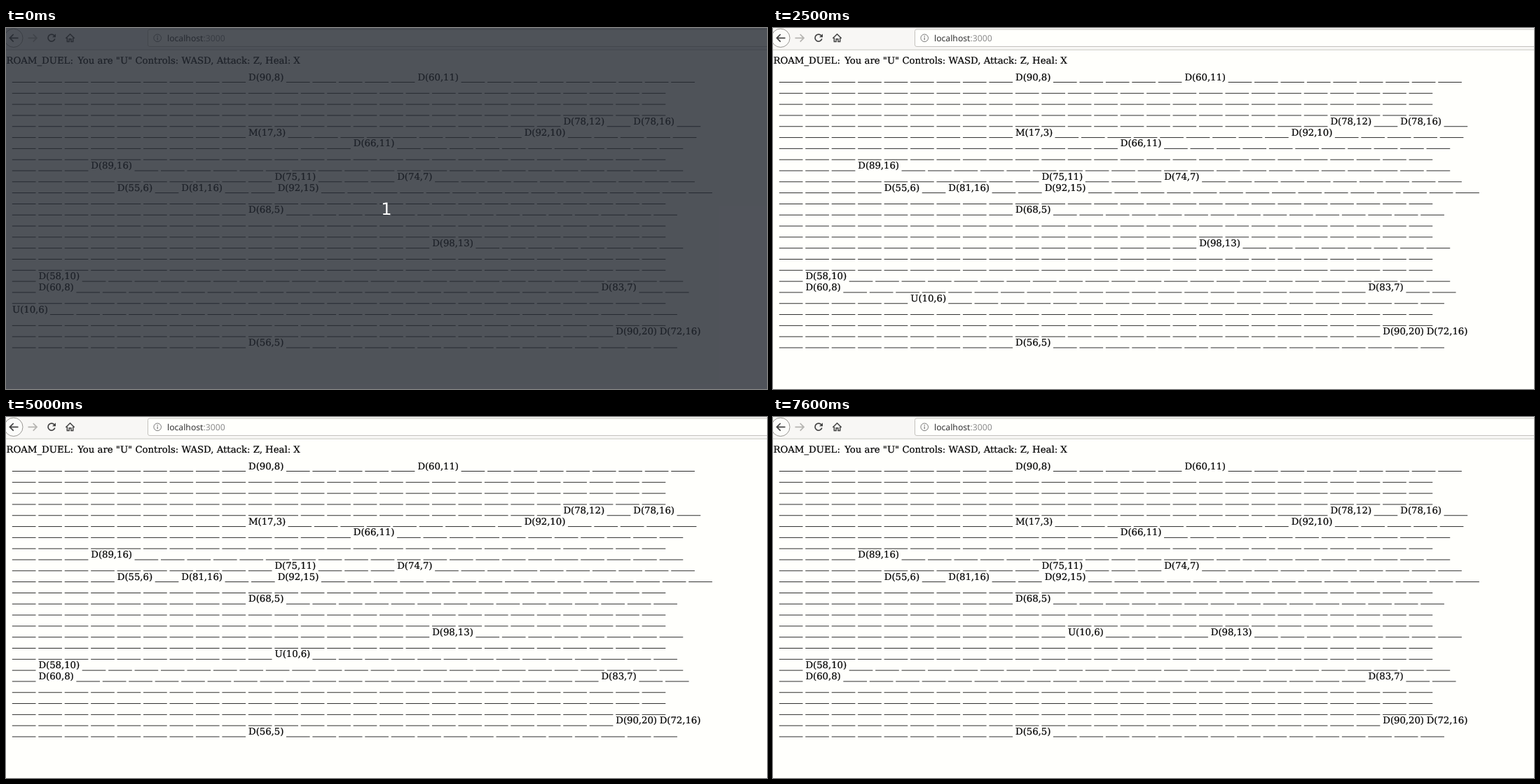
These frames come from a looping animation (1086x516 px, 8 s). An HTML page:

```html
<!DOCTYPE html>
<html lang="en">
<head>
<meta charset="utf-8">
<title>Grid game</title>
<style>
html, body { margin: 0; width: 100%; height: 100%; overflow: hidden; background: #fffffc; }
svg { display: block; width: 100vw; height: 100vh; }
text { white-space: pre; text-rendering: geometricPrecision; }
.page text { font: 13.315px "DejaVu Serif", serif; letter-spacing: -.06px; fill: #000; stroke: #000; stroke-width: .22; }
.page .title { letter-spacing: -.02px; }
.url { font: 12.2px "Noto Sans", "Open Sans", sans-serif; fill: #333; }
.icon { fill: none; stroke: #444; stroke-width: 1.7; }
</style>
</head>
<body>
<svg viewBox="0 0 1086 516">
  <rect width="1086" height="516" fill="#fffffc"/>
  <rect width="1086" height="31" fill="#f8f7f5"/>
  <path d="M0 31.2H1086" stroke="#c9c7c3"/>
  <rect x="202.5" y="2" width="900" height="24.5" rx="2.5" fill="#fffffc" stroke="#c4c2be"/>
  <circle cx="10.8" cy="14.3" r="13.2" fill="#fcfcfa" stroke="#999793"/>
  <path class="icon" d="M17.5 14.3H5.5M10.7 9L5.4 14.3L10.7 19.6"/>
  <path class="icon" style="stroke:#b5b4b1" d="M31.5 14.3H43.5M38.7 9L44 14.3L38.7 19.6"/>
  <path class="icon" d="M69.2 11.4A5 5 0 1 0 69.8 15.6"/>
  <path d="M71 8.2V13.2H66Z" fill="#444"/>
  <path class="icon" style="stroke-width:1.5" d="M85.3 14.8L91.5 8.8L97.7 14.8M87.3 14V19.5H90.1V15.8H92.9V19.5H95.7V14"/>
  <circle cx="216.2" cy="14.3" r="5.3" fill="none" stroke="#777"/>
  <path d="M216.2 13.4V17.3M216.2 11.1V12.4" stroke="#777" stroke-width="1.2"/>
  <text class="url" x="230" y="18.7">localhost<tspan fill="#8c8c8c">:3000</tspan></text>
  <g class="page">
    <text class="title" x="0.4" y="50.7">ROAM_DUEL:</text>
    <text class="title" x="102.2" y="50.7">You are "U" Controls: WASD, Attack: Z, Heal: X</text>
    <path id="blanks" stroke="#000" stroke-width=".83"/>
    <g id="labels"></g>
  </g>
  <g id="countdown">
    <rect width="1086" height="516" fill="#242831" fill-opacity=".8"/>
    <text x="543" y="267.3" text-anchor="middle" font-family="DejaVu Sans, sans-serif" font-size="24" fill="#fff">1</text>
  </g>
</svg>
<script>
const LOOP = 8000, SIZE = 25, SCALE = 0.8322;
const LEFT = 9, TOP = 74.6, LINE = 19 * SCALE;
const BLANK = 40, SPACE = 5, DROP = 3.5 * SCALE;
const ADVANCE = { D: 13, U: 13, M: 16, "(": 6, ")": 6, ",": 5 };

// Occupied cells by row, as "column:label"
const units = {
  0: "9:D(90,8) 15:D(60,11)",
  4: "21:D(78,12) 23:D(78,16)",
  5: "9:M(17,3) 19:D(92,10)",
  6: "13:D(66,11)",
  8: "3:D(89,16)",
  9: "10:D(75,11) 14:D(74,7)",
  10: "4:D(55,6) 6:D(81,16) 9:D(92,15)",
  12: "9:D(68,5)",
  15: "16:D(98,13)",
  18: "1:D(58,10)",
  19: "1:D(60,8) 22:D(83,7)",
  23: "23:D(90,20) 24:D(72,16)",
  24: "9:D(56,5)"
};

// Player moves, as "time:keys"
const moves = `700:S 1100:D 1300:D 1500:D 1600:D 1800:D 2200:W 2500:W 2600:W
  2800:D 2900:D 3100:D 3300:D 3500:D 3700:D 3900:W 4300:W 4500:AA 5000:D
  5200:D 5600:S 6000:A 6700:W 6900:W 7500:W 7600:D`
  .split(/\s+/).map(move => move.split(":"));
const STEP = { W: [0, -1], A: [-1, 0], S: [0, 1], D: [1, 0] };

const [blanks, labels, countdown] =
  ["blanks", "labels", "countdown"].map(id => document.getElementById(id));

const grid = Array.from({ length: SIZE }, (_, row) => {
  const cells = Array(SIZE).fill("");
  for (const unit of (units[row] || "").split(" ").filter(Boolean)) {
    const [col, label] = unit.split(":");
    cells[col] = label;
  }
  return cells;
});

const widthOf = label => [...label].reduce((sum, ch) => sum + (ADVANCE[ch] || 10), 0);

function drawBoard(playerCol, playerRow) {
  let path = "", markup = "";
  grid.forEach((cells, row) => {
    const y = TOP + row * LINE;
    let x = LEFT;
    cells.forEach((cell, col) => {
      const label = row === playerRow && col === playerCol ? "U(10,6)" : cell;
      if (label) markup += `<text x="${x.toFixed(2)}" y="${y.toFixed(2)}">${label}</text>`;
      else path += `M${(x - 0.2).toFixed(2)} ${(y + DROP).toFixed(2)}h33.7`;
      x += ((label ? widthOf(label) : BLANK) + SPACE) * SCALE;
    });
  });
  blanks.setAttribute("d", path);
  labels.innerHTML = markup;
}

function playerAt(time) {
  let col = 0, row = 21;
  for (const [start, keys] of moves) {
    if (time < +start) break;
    for (const key of keys) {
      col += STEP[key][0];
      row += STEP[key][1];
    }
  }
  return [col, row];
}

let shown = "";
function render(time) {
  countdown.style.display = time < 200 ? "" : "none";
  const place = playerAt(time);
  if (String(place) === shown) return;
  shown = String(place);
  drawBoard(...place);
}

const begin = performance.now();
function tick() {
  render((performance.now() - begin) % LOOP);
  requestAnimationFrame(tick);
}
tick();
</script>
</body>
</html>
```
